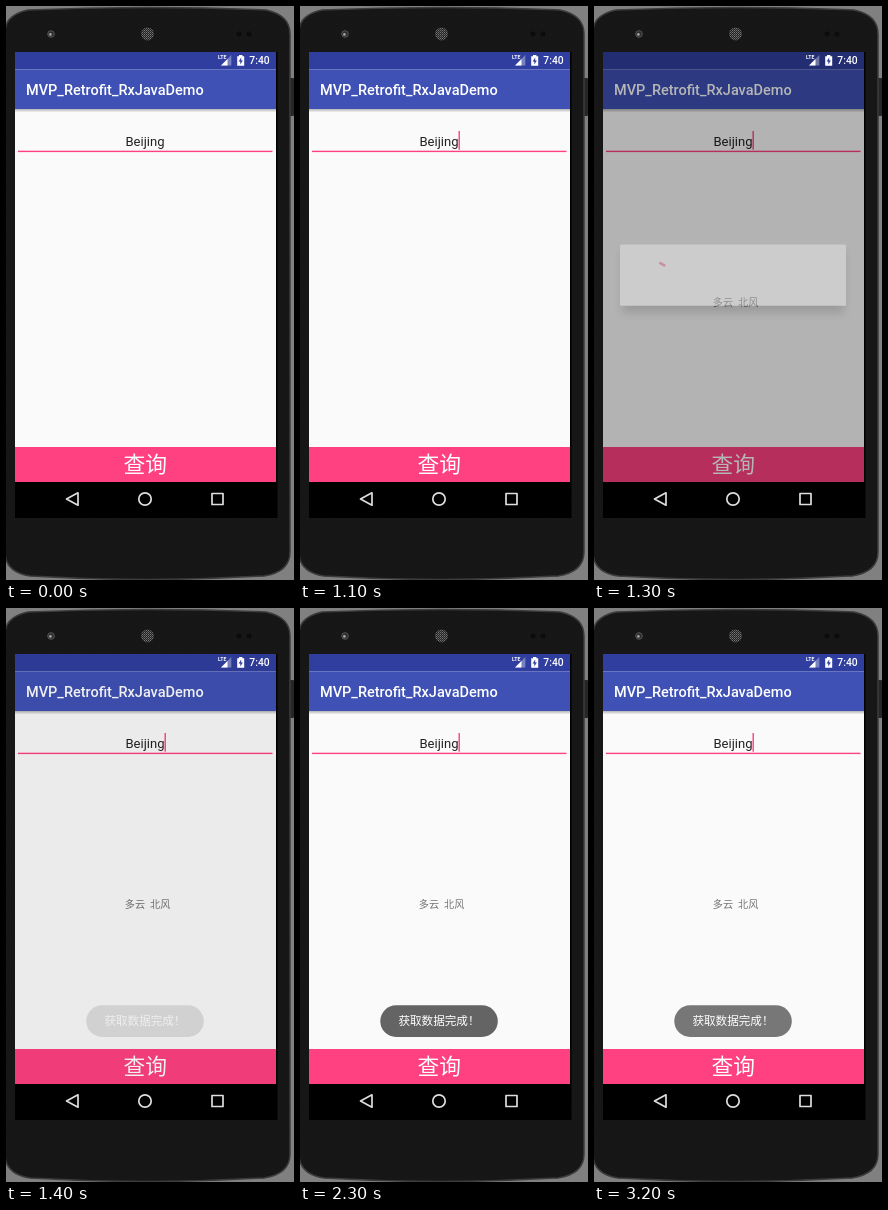
These frames come from a looping animation (288 px wide and 574 px high, 3300 ms). An HTML page:

```html
<!DOCTYPE html>
<html lang="zh-CN">
<head>
<meta charset="utf-8">
<title>Weather query</title>
<style>
html, body { margin: 0; width: 100%; height: 100%; overflow: hidden; background: #808080; }
svg { display: block; width: 288px; height: 574px; }
text { font-family: Roboto, "Noto Sans CJK SC", "Noto Sans CJK", sans-serif; white-space: pre; }
.mid { text-anchor: middle; }
#cursor, #scrim, #dialog, #weather, #toast { animation: 3300ms step-end infinite; }
#cursor { animation-name: blink; }
#scrim { animation-name: dim; }
#dialog { animation-name: dialog; }
#weather { animation-name: result; }
#toast { animation-name: toast; }
@keyframes blink {
  0%, 18.18%, 54.54%, 81.81% { opacity: 0; }
  3.03%, 33.33%, 69.69%, 96.96% { opacity: 1; }
  100% { opacity: 1; }
}
@keyframes dim {
  0%, 45.45%, 100% { opacity: 0; }
  36.36% { opacity: .22; }
  39.39% { opacity: .285; }
  42.42% { opacity: .06; }
}
@keyframes dialog {
  0%, 42.42%, 100% { opacity: 0; }
  36.36% { opacity: 1; }
  39.39% { opacity: .36; }
}
@keyframes result {
  0% { opacity: 0; }
  39.39%, 100% { opacity: 1; }
}
@keyframes toast {
  0% { opacity: 0; }
  42.42% { opacity: .19; }
  45.45% { opacity: .46; }
  48.48% { opacity: .72; }
  51.51% { opacity: .92; }
  54.54% { opacity: 1; }
  96.96%, 100% { opacity: .87; }
}
</style>
</head>
<body>
<svg viewBox="0 0 288 574" xmlns="http://www.w3.org/2000/svg">
  <defs>
    <pattern id="grain" width="3" height="3" patternUnits="userSpaceOnUse">
      <rect width="3" height="3" fill="#151515"/>
      <path d="M0 .5h1M1.5 2h1" stroke="#1b1b1b"/>
    </pattern>
    <pattern id="mesh" width="2" height="2" patternUnits="userSpaceOnUse">
      <rect width="2" height="2" fill="#222"/>
      <rect width="1" height="1" fill="#777"/>
      <rect x="1" y="1" width="1" height="1" fill="#555"/>
    </pattern>
    <linearGradient id="drop" x2="0" y2="1">
      <stop stop-color="#000" stop-opacity=".28"/>
      <stop offset="1" stop-color="#000" stop-opacity="0"/>
    </linearGradient>
    <filter id="blur" x="-20%" y="-40%" width="140%" height="200%">
      <feGaussianBlur stdDeviation="5"/>
    </filter>
  </defs>

  <!-- handset -->
  <rect width="288" height="574" fill="#808080"/>
  <rect x="283" y="72" width="5" height="38" rx="1" fill="#262626"/>
  <path d="M-1 26Q-1 9 22 4Q141 -1 260 4Q284 9 284 28V546Q284 566 258 570Q141 577 24 570Q-1 566 -1 546Z"
        fill="url(#grain)" stroke="#3c3c3c" stroke-width="1.5"/>
  <circle cx="45" cy="28" r="3.3" fill="#2c2c2c" stroke="#555"/>
  <circle cx="44.4" cy="28.4" r="1.3" fill="#aaa"/>
  <circle cx="141.5" cy="28" r="6.5" fill="url(#mesh)"/>
  <circle cx="233" cy="28" r="2.5" fill="#0c0c0c"/>
  <circle cx="243" cy="28" r="2.5" fill="#0c0c0c"/>

  <!-- app -->
  <rect x="9" y="46" width="262.5" height="466" fill="#000"/>
  <rect x="9" y="46" width="261" height="430" fill="#fafafa"/>
  <rect x="9" y="46" width="261" height="17.5" fill="#303f9f"/>
  <rect x="9" y="63.5" width="261" height="39.5" fill="#3f51b5"/>
  <rect x="9" y="103" width="261" height="3.5" fill="url(#drop)"/>
  <text x="20" y="89" font-size="14.5" font-weight="500" fill="#fff">MVP_Retrofit_RxJavaDemo</text>
  <text class="mid" x="139" y="139.5" font-size="13.05" fill="#212121">Beijing</text>
  <rect x="12" y="144.7" width="254.5" height="1.4" fill="#ff4081"/>
  <rect id="cursor" x="158.5" y="125" width="1.4" height="18.7" fill="#ff4081"/>
  <text id="weather" class="mid" x="141.6" y="299.8" font-size="10.15" fill="#757575">多云  北风</text>
  <rect x="9" y="441" width="261" height="35" fill="#ff4081"/>
  <text class="mid" x="139.3" y="466.3" font-size="21.75" fill="#fff">查询</text>
  <rect id="scrim" x="9" y="46" width="261" height="430"/>

  <!-- system bars -->
  <g fill="#fff">
    <text x="212" y="53" font-size="5.2" font-weight="700" textLength="">LTE</text>
    <path d="M225.3 49V59.5H215Z" opacity=".35"/>
    <path d="M221.5 53V59.5H215Z"/>
    <path d="M233 49h3.4v1.3h1.8V59.7h-7V50.3H233Z"/>
    <path d="M235.2 51.6l-2.6 3.9h1.7v3l2.6-3.9h-1.7z" fill="#303f9f"/>
    <text x="243.3" y="58.3" font-size="10.3" font-weight="500">7:40</text>
  </g>
  <g fill="none" stroke="#dedede" stroke-width="1.7" stroke-linejoin="round">
    <path d="M60.5 493L72 486.8V499.2Z"/>
    <circle cx="139" cy="493" r="6.2"/>
    <rect x="206" y="487.5" width="11" height="11"/>
  </g>

  <!-- overlays -->
  <g id="dialog">
    <rect x="28" y="246" width="222" height="61" fill="#000" opacity=".38" filter="url(#blur)"/>
    <rect x="26" y="238.5" width="226" height="61.3" rx="1.5" fill="#fafafa"/>
    <path d="M65.3 256.6L71.2 259.9" stroke="#f0507f" stroke-width="2.6"/>
  </g>
  <g id="toast">
    <rect x="80.3" y="397.3" width="117.5" height="31.7" rx="15.8" fill="#646464"/>
    <text x="98.4" y="417.4" font-size="11.6" fill="#fff">获取数据完成！</text>
  </g>
</svg>
</body>
</html>
```
